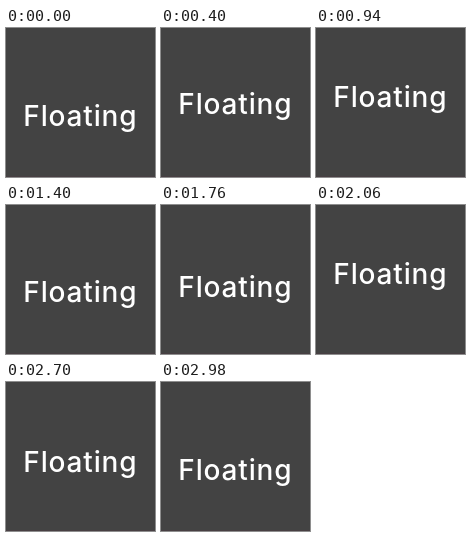
An HTML page for the animation above (3 s loop, 149 by 149 pixels).

```html
<!DOCTYPE html>
<html>
<head>
<meta charset="utf-8">
<style>
  html, body { margin: 0; width: 100%; height: 100%; overflow: hidden; background: #434343; }
  svg { display: block; width: 149px; height: 149px; }
  text {
    font: 500 28px Inter, sans-serif;
    letter-spacing: 0.03em;
    text-anchor: middle;
    fill: #fff;
  }
</style>
</head>
<body>
<svg viewBox="0 0 149 149">
  <rect y="148" width="149" height="1" fill="#483f43"/>
  <text id="word" x="74.4" y="98">Floating</text>
</svg>
<script>
  const word = document.getElementById('word');
  const PERIOD = 1500, RISE = 22;

  function draw() {
    const phase = performance.now() % PERIOD / PERIOD;
    const lift = RISE * (1 - Math.cos(phase * 2 * Math.PI)) / 2;
    word.setAttribute('transform', `translate(0 ${-lift.toFixed(2)})`);
    requestAnimationFrame(draw);
  }
  draw();
</script>
</body>
</html>
```
